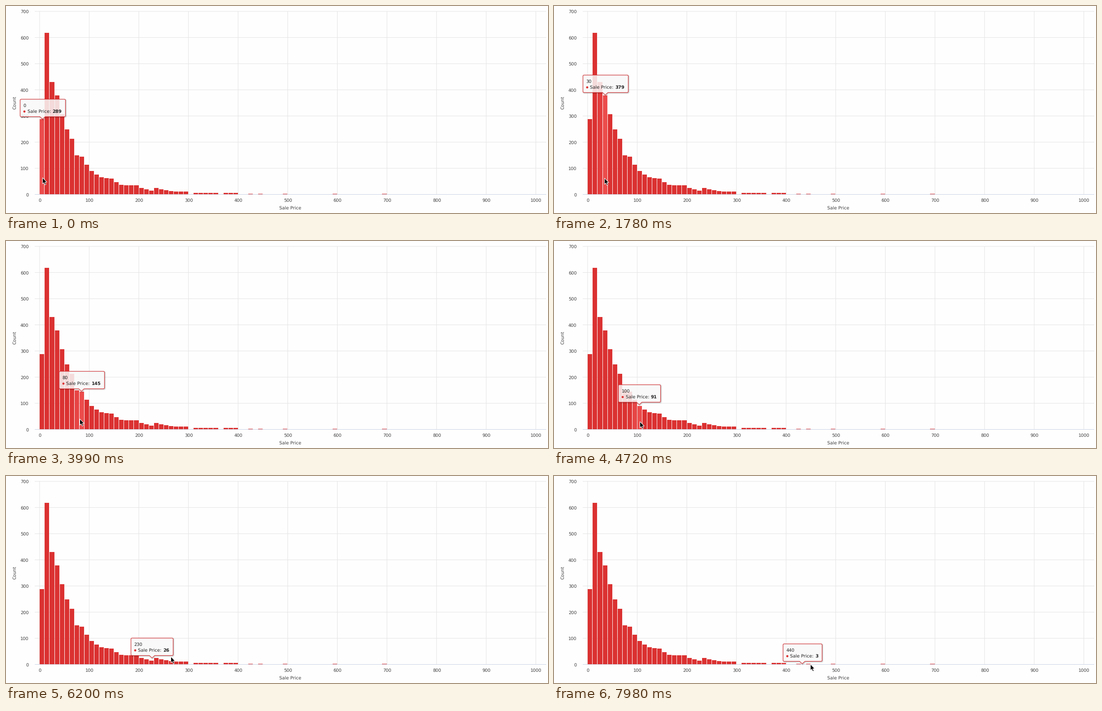
Animation of 1208 by 463 pixels, one loop 8000 ms. Source, as a matplotlib script:

```python
import math

import matplotlib.pyplot as plt
import numpy as np
from matplotlib.animation import FuncAnimation
from matplotlib.collections import LineCollection, PolyCollection
from matplotlib.patches import Circle, PathPatch, Polygon
from matplotlib.path import Path

plt.rcParams["text.hinting"] = "none"

W, H, DPI = 1208, 463, 64
PX = 72 / DPI
LOOP, INTERVAL = 8000, 40

# The picture refreshes in steps; the hover logic runs in finer ticks.
FIRST_STEP, STEP, STEPS = 300, 147.6, 53
TICKS = 10
FOLLOW = 0.17        # share of the way the tooltip covers per tick
HOVER_LAG = 0.2      # steps between pointer and hover
HIDE_AFTER = 34      # ticks the tooltip stays once the pointer left

X0, Y0 = 74.85, 421.5
BAR, UNIT = 11.06, 0.585
RED, LIT = np.array([219, 49, 49]) / 255, np.array([236, 76, 76]) / 255

# Key bars of the histogram; the ones between follow exponential decay.
KEY_COUNTS = {0: 289, 1: 619, 2: 430, 3: 379, 5: 250, 6: 213, 7: 150, 8: 145,
              10: 91, 12: 66, 14: 61, 16: 37, 19: 35, 22: 15, 23: 26, 27: 11, 29: 11}

# step, x, y of the pointer
POINTER = np.array([
    (-1, 81, 384), (0, 92, 385), (4, 92, 385), (9, 112, 385), (11, 112, 385),
    (15, 124, 387), (16, 124, 387), (20, 140, 391), (24, 164, 398),
    (25, 164, 398), (30, 191, 404), (34, 234, 409), (39, 312, 411),
    (40, 367, 404), (46, 479, 416), (47, 479, 416), (52, 571, 421)])


def make_counts():
    logs = np.interp(range(30), list(KEY_COUNTS), np.log(list(KEY_COUNTS.values())))
    counts = dict(enumerate(int(round(v)) for v in np.exp(logs)))
    counts.update({k: 7 for k in range(31, 40) if k != 36})
    counts.update({k: 3 for k in (42, 44, 49, 59, 69)})
    return counts


COUNTS = make_counts()


def bar_left(k):
    return math.ceil(X0 + BAR * k)


def bar_peak(k):
    return np.array([X0 + BAR * (k + 0.5), Y0 - UNIT * COUNTS[k]])


def pointer_at(step):
    return np.array([np.interp(step, POINTER[:, 0], POINTER[:, i]) for i in (1, 2)])


def bar_under(point):
    k = int((point[0] - X0) // BAR)
    return k if k in COUNTS and point[1] >= bar_peak(k)[1] else None


def simulate():
    """Pointer, hovered bar, tooltip anchor and bar glow for every step."""
    states, bar, anchor, away = [], None, None, 0
    glow = dict.fromkeys(COUNTS, 0.0)
    for tick in range(-TICKS, (STEPS - 1) * TICKS + 1):
        step = tick / TICKS
        hit = bar_under(pointer_at(step - HOVER_LAG))
        away = 0 if hit is not None else away + 1
        if hit is not None:
            if bar is None:
                anchor = bar_peak(hit)
            bar = hit
        elif away > HIDE_AFTER:
            bar = None
        glow = {k: max(0, g - 0.03) for k, g in glow.items()}
        if bar is not None:
            peak = bar_peak(bar)
            anchor = anchor + FOLLOW * (peak - anchor)
            gap = np.hypot(*(peak - anchor))
            if gap < 1:
                anchor = peak
            if gap < 4:
                glow[bar] = 1
        if tick % TICKS == 0:
            states.append((pointer_at(step).round(), bar, anchor, glow))
    return states


def balloon(left, bottom, width, tip_x, height=39, r=2.5):
    right, top = left + width, bottom - height
    tail = [(tip_x + 6, bottom), (tip_x, bottom + 5.5), (tip_x - 6, bottom)]
    corners = [((right, top + r), (right, top), (right - r, top)),
               ((left + r, top), (left, top), (left, top + r)),
               ((left, bottom - r), (left, bottom), (left + r, bottom))]
    points = tail[::-1] + [(right - r, bottom), (right, bottom), (right, bottom - r)]
    codes = [Path.MOVETO] + [Path.LINETO] * 3 + [Path.CURVE3] * 2
    for corner in corners:
        points += corner
        codes += [Path.LINETO, Path.CURVE3, Path.CURVE3]
    return Path(points + [tail[2]], codes + [Path.CLOSEPOLY])


fig = plt.figure(figsize=(W / DPI, H / DPI), dpi=DPI, facecolor="#fefefe")
ax = fig.add_axes([0, 0, 1, 1])
ax.set_xlim(0, W)
ax.set_ylim(H, 0)
ax.axis("off")


def write(x, y, text, size=10, color="#404040", **kw):
    return ax.text(x, y, text, fontsize=size * PX, color=color,
                   family="DejaVu Sans", **kw)


def draw_lines(segments, color, zorder):
    lines = LineCollection(segments, colors=color, linewidths=PX, zorder=zorder)
    lines.set_snap(False)
    ax.add_collection(lines)


rows = [Y0 - 58.5 * k for k in range(8)]
columns = [X0 + 10 * BAR * k for k in range(11)]
draw_lines([[(64, y), (1204, y)] for y in rows[1:]]
           + [[(x, rows[-1]), (x, rows[0])] for x in columns], "#e3e3e3", 1)
draw_lines([[(64, rows[0]), (1204, rows[0])]], "#c8d2e4", 3)
for k, y in enumerate(rows):
    write(50.5, y + 4, str(100 * k), 9.7, ha="right")
for k, x in enumerate(columns):
    write(x + 0.5, 438, str(100 * k), 9.7, ha="center")
write(633.5, 454.5, "Sale Price", ha="center")
write(19.5, 216, "Count", rotation=90, ha="center", va="center")

boxes = []
for k in COUNTS:
    left, right = bar_left(k), bar_left(k + 1) - 1
    top = math.floor(bar_peak(k)[1] + 0.8)
    boxes.append([(left, top), (right, top), (right, 421), (left, 421)])
bars = PolyCollection(boxes, edgecolors="none", linewidths=0, zorder=2)
ax.add_collection(bars)

empty = Path([(0, 0), (1, 1)])
shadows = [PathPatch(empty, fill=False, ec="black", alpha=a, lw=w * PX, zorder=5)
           for w, a in ((5, .04), (3, .08), (1, .13))]
body = PathPatch(empty, fc=(.976, .976, .976, .85), ec="#d93a3d", lw=1.2 * PX, zorder=6)
dot = Circle((0, 0), 2.4, fc="#dc3333", ec="none", zorder=7)
arrow = Polygon([(0, 0)], closed=True, fc="black", ec="white", lw=PX, zorder=9)
for patch in (*shadows, body, dot, arrow):
    ax.add_patch(patch)
header = write(0, 0, "", 9.7, "#222222", zorder=7)
name = write(0, 0, "Sale Price:", 10, "#222222", zorder=7)
value = write(0, 0, "", 10, "#222222", weight="bold", zorder=7)
tooltip = (*shadows, body, dot, header, name, value)

ARROW = np.array([(0.5, 0), (0.5, 13.8), (3.6, 10.9), (5.8, 16), (8.2, 15),
                  (6, 10), (10.2, 10)])
STATES = simulate()


def place_tooltip(bar, anchor):
    count = str(COUNTS[bar])
    width = 80 + 7 * len(count)
    tip = anchor[0] + 1
    left = math.floor(tip - width / 2 + 0.5) + 0.5
    bottom = math.floor(anchor[1] - 5.3) + 0.5
    top = bottom - 39
    body.set_path(balloon(left, bottom, width, tip))
    for shadow in shadows:
        shadow.set_path(balloon(left + 1, bottom + 1, width, tip + 1))
    dot.center = (left + 9.5, top + 27.5)
    header.set_position((left + 7, top + 17.5))
    header.set_text(str(10 * bar))
    name.set_position((left + 16, top + 30.5))
    value.set_position((left + 72, top + 30.5))
    value.set_text(count)


def update(frame):
    time = (frame + 1) * INTERVAL - 1
    step = max(-1, min(STEPS - 1, math.floor((time - FIRST_STEP) / STEP)))
    pointer, bar, anchor, glow = STATES[step + 1]
    bars.set_facecolor([RED + (LIT - RED) * glow[k] for k in COUNTS])
    arrow.set_xy(ARROW + pointer)
    for artist in tooltip:
        artist.set_visible(bar is not None)
    if bar is not None:
        place_tooltip(bar, anchor)
    return (bars, arrow, *tooltip)


anim = FuncAnimation(fig, update, frames=LOOP // INTERVAL, interval=INTERVAL,
                     repeat=True, repeat_delay=0, blit=False)
plt.show()
```
